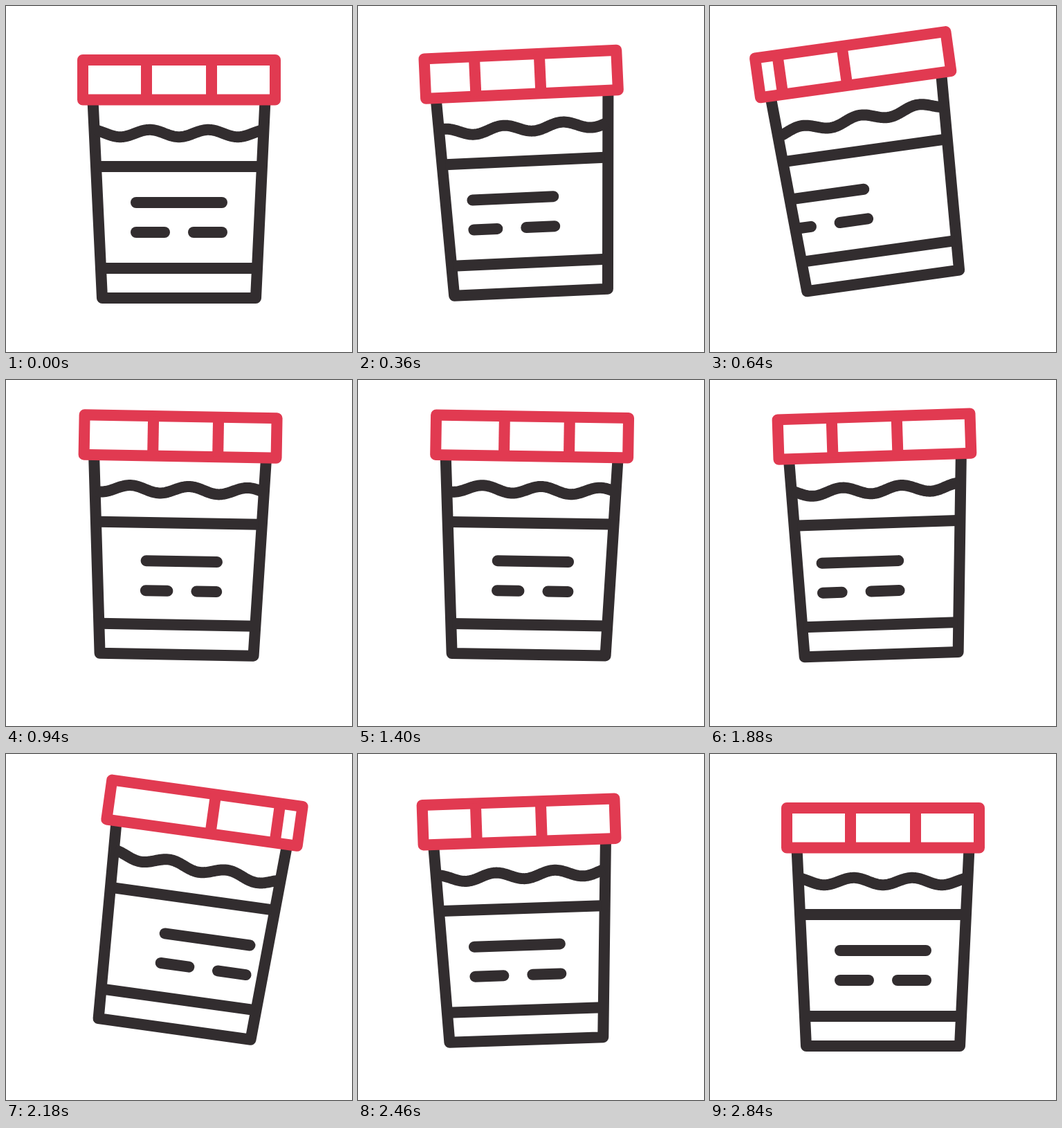
These frames come from a looping animation (500x500 px, 3000 ms). An HTML page with a canvas:

```html
<!DOCTYPE html>
<html lang="en">
<head>
<meta charset="utf-8">
<title>Shaking jar</title>
<style>
  html, body { margin: 0; width: 100%; height: 100%; overflow: hidden; background: #fff; }
  canvas { display: block; }
</style>
</head>
<body>
<canvas id="stage" width="500" height="500"></canvas>
<script>
const ctx = document.getElementById('stage').getContext('2d');
const DARK = '#322d2f', RED = '#e13a51';
const LOOP = 3000, START = 170, SWING = 500, SETTLE_START = 2170, SETTLE = 667;

const clamp = (v, lo, hi) => Math.min(hi, Math.max(lo, v));
const ease = x => x * x * (3 - 2 * x);
const progress = (t, start, length) => clamp((t - start) / length, 0, 1);

// Four wide swings, then two small ones, alternating left and right.
const peakTilt = i => i < 1 || i > 6 ? 0 : (i < 5 ? 8 : 3.6) * (-1) ** i;
// The label lags behind once the shaking tires.
const peakLabel = i => peakTilt(i) * (i < 4 ? 8.7 : 4);
const peakWave = i => -7.8 * peakTilt(i) - 2.6 * Math.abs(peakTilt(i));

function line(...points) {
  ctx.beginPath();
  for (let i = 0; i < points.length; i += 2) ctx.lineTo(points[i], points[i + 1]);
  ctx.stroke();
}

// Coordinates are relative to the middle of the jar's bottom edge.
function draw(t) {
  const settle = progress(t, SETTLE_START, SETTLE);
  const beat = 4 * progress(t, START, 4 * SWING) + 3 * settle;
  const i = Math.floor(beat), s = ease(beat - i);
  const between = peak => peak(i) + (peak(i + 1) - peak(i)) * s;

  const tilt = between(peakTilt), wave = between(peakWave);
  const lift = 25.3 * ease(progress(t, START, SWING)) * (1 - settle) ** 1.8;
  const drift = -0.12 * lift - 6.5 * Math.sin(Math.PI * settle);

  ctx.setTransform(1, 0, 0, 1, 0, 0);
  ctx.fillStyle = '#fff';
  ctx.fillRect(0, 0, 500, 500);
  ctx.translate(250 + drift - 0.4 * tilt, 422 - lift);
  ctx.rotate(tilt * Math.PI / 180);
  ctx.lineWidth = 16;
  ctx.lineJoin = 'round';

  ctx.strokeStyle = DARK;
  ctx.lineCap = 'butt';
  line(-124.5, -286, -111, 0, 111, 0, 124.5, -286);
  line(-115, -190, 115, -190);
  line(-111, -43, 111, -43);

  // The liquid tilts a little further than the jar.
  const slope = 0.3 * tilt * Math.PI / 180;
  ctx.beginPath();
  for (let x = -121; x <= 121; x += 2) {
    const ripple = 5.2 * Math.cos((x - wave) * 2 * Math.PI / 85);
    ctx.lineTo(x, -238 + ripple + slope * (x - wave));
  }
  ctx.stroke();

  // Outer dash ends stop at the jar's sides.
  const labelX = x => -0.1 * lift + between(k => clamp(peakLabel(k) + x, -110, 110));
  const left = labelX(-62), right = labelX(62);
  const row1 = -138 + 0.13 * lift, row2 = row1 + 43;
  ctx.lineCap = 'round';
  line(left, row1, right, row1);
  line(left, row2, labelX(-21), row2);
  line(labelX(21), row2, right, row2);

  ctx.strokeStyle = RED;
  ctx.lineCap = 'butt';
  ctx.strokeRect(-139, -344, 278, 57.5);
  for (const x of [-47, 47]) line(x + 7.5 * tilt, -344, x + 7.5 * tilt, -287);
}

function tick() {
  draw(performance.now() % LOOP);
  requestAnimationFrame(tick);
}
tick();
</script>
</body>
</html>
```
